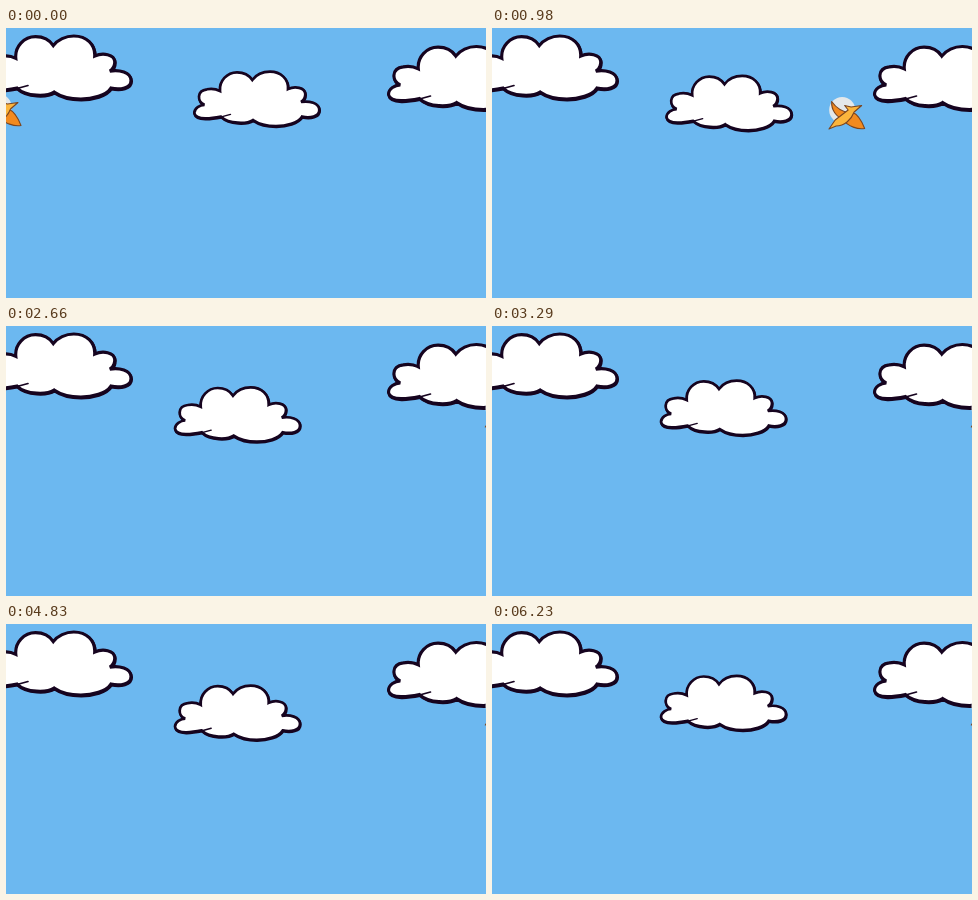
Recreate the animation shown at these times as an HTML page. Size 480 px wide and 270 px high, loop 6300 ms.

```html
<!DOCTYPE html>
<html>
<head>
<meta charset="utf-8">
<style>
  html, body { margin: 0; width: 100%; height: 100%; overflow: hidden; background: #6cb8f0; }
  svg { display: block; width: 480px; height: 270px; }
</style>
</head>
<body>
<svg viewBox="0 0 480 270">
  <defs>
    <path id="puff" d="M28 46.6 C20 48.2 2.5 51 1.3 43 C1.3 38 7 35 11.5 34.8 C4 32 3.5 20.5 14 19.3
      C18 18.5 23 19 27 21 C26 11 34 2.3 44 2.3 C51 2.3 56 5 59.3 10 C63 5 70 1.7 77 1.7
      C88 1.7 95.5 9 95 19 C102 15.8 112 17.5 112.3 24 C112.3 28 110.5 30.5 108 32
      C116 30.5 126.3 33 126.3 40 C126.3 46.8 117 48.2 109 46.6 C105 53 93 56 83 56
      C73 56 65 53.5 60 50 C54 54 36 54.3 28 46.6 Z"/>
    <g id="cloud" stroke="#16041f" stroke-width="2.7" stroke-linecap="round">
      <use href="#puff" fill="#16041f" x=".4" y=".8"/>
      <use href="#puff" fill="#fff"/>
      <path d="M22 47.6 Q30 47 37.5 44.4" fill="none" stroke-width="1.4"/>
    </g>
  </defs>
  <use href="#cloud" transform="translate(-21.5 6) scale(1.16)"/>
  <use href="#cloud" transform="translate(381 16.5) scale(1.16)"/>
  <use href="#cloud" id="drifter"/>
  <g id="bird" stroke="#7a4520" stroke-width="1.1" stroke-linejoin="round">
    <circle cx="350" cy="82" r="13" fill="#e4e8ea" stroke="none"/>
    <path d="M339.5 73.5 C339 82 344 89 352 92 L358 85 C351 84 344 80 339.5 73.5 Z" fill="#f28a1e"/>
    <path d="M350 91 L360 84 C367 87 370 94 372.5 100.5 C366 101.5 356 99 350 91 Z" fill="#f28a1e"/>
    <path d="M336.8 101 L343 92 L356 82 L352.5 77.5 L359 79 L369.5 77.5 L362 84 C359 92 352 98 344 98 Z" fill="#fbb53c"/>
  </g>
</svg>
<script>
  const LOOP = 6300, STEP = 70, FLIGHT = 1370, SINK_START = 620, SINK_END = 1340;
  const drifter = document.getElementById('drifter');
  const bird = document.getElementById('bird');
  const clamp = v => Math.min(1, Math.max(0, v));
  const smooth = v => v * v * (3 - 2 * v);
  const move = (el, x, y) => el.setAttribute('transform', `translate(${x} ${y})`);

  // The middle cloud sinks to its resting height, then bobs there.
  function cloudTop(t) {
    if (t < SINK_END) return 42 + 8.5 * smooth(clamp((t - SINK_START) / (SINK_END - SINK_START)));
    return 55.2 + 5 * Math.cos((t - 2485) / 2500 * 2 * Math.PI);
  }

  function draw() {
    const t = Math.floor(performance.now() % LOOP / STEP) * STEP;
    const flight = clamp(t / FLIGHT);
    move(drifter, 187 - 19.3 * flight, cloudTop(t));
    move(bird, -357.5 + 500 * flight, -3 * (1 - clamp(t / 980)));
    requestAnimationFrame(draw);
  }
  draw();
</script>
</body>
</html>
```
